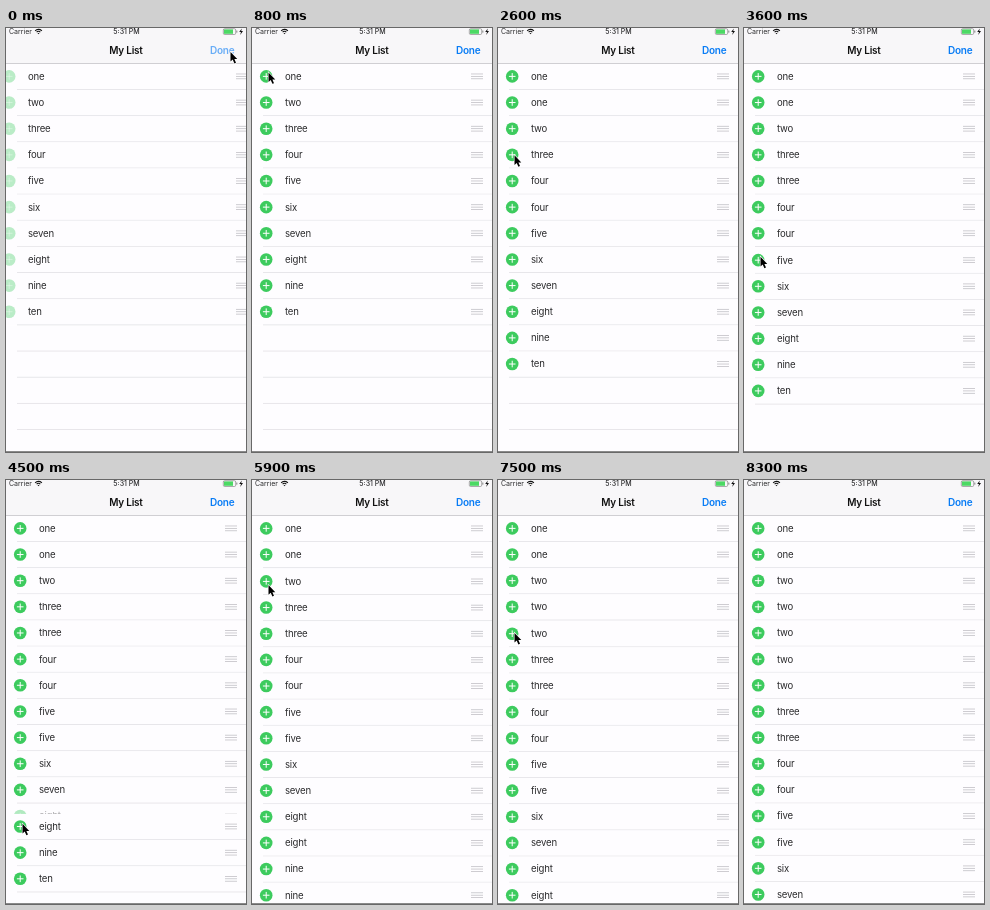
These frames come from a looping animation (240 by 424 pixels, 10000 ms). An HTML page with a canvas:

```html
<!DOCTYPE html>
<html lang="en">
<head>
<meta charset="utf-8">
<title>My List</title>
<style>
  html, body { margin: 0; width: 100%; height: 100%; overflow: hidden; background: #fff; }
  canvas { display: block; width: 240px; height: 424px; }
</style>
</head>
<body>
<canvas id="stage"></canvas>
<script>
const W = 240, H = 424, LOOP = 10000, STEP = 100;
const ROW = 26.15, LIST_TOP = 35.3, VISIBLE_ROWS = 15;
const SLIDE = 300, LEAD = 30, TAP_GAP = 400, LINGER = 200, TRAVEL = 220;
const NAMES = 'one two three four five six seven eight nine ten'.split(' ');
const PAPER = '#fefdff', INK = '#2b2b2d', GREEN = '#3dcb5e', BLUE = '#087cf5';

// The pointer aims at a fractional row; each tap there duplicates that row.
const visit = (aim, at, taps = 1) => ({ aim, at: at - LEAD, taps });
const VISITS = [
  visit(0.35, 1000), visit(4.15, 2200), visit(3.52, 3000), visit(7.4, 3600), visit(11.8, 4400),
  visit(13.5, 5000), visit(2.67, 5900, 2), visit(8.8, 6800, 0), visit(4.5, 7500, 2),
];
const TAPS = VISITS.flatMap(({ aim, at, taps }) =>
  Array.from({ length: taps }, (_, i) => ({ index: Math.floor(aim), at: at + i * TAP_GAP })));

const canvas = document.getElementById('stage');
const ctx = canvas.getContext('2d');
const scale = window.devicePixelRatio || 1;
canvas.width = W * scale;
canvas.height = H * scale;

const clamp = v => Math.min(1, Math.max(0, v));
const smooth = v => { v = clamp(v); return v * v * (3 - 2 * v); };
const mix = (a, b, k) => a + (b - a) * k;

function rect(x, y, w, h, color) {
  ctx.fillStyle = color;
  ctx.fillRect(x, y, w, h);
}

function text(label, x, y, font, color, align = 'left', spacing = 0) {
  ctx.font = font + ' Inter, sans-serif';
  ctx.letterSpacing = spacing + 'px';
  ctx.textAlign = align;
  ctx.fillStyle = color;
  ctx.fillText(label, x, y);
}

function disc(x, y, r, color) {
  ctx.beginPath();
  ctx.arc(x, y, r, 0, 7);
  ctx.fillStyle = color;
  ctx.fill();
}

function shape(path, color) {
  ctx.fillStyle = color;
  ctx.fill(new Path2D(path));
}

const separator = y => rect(11, y - 0.3, W - 11, 0.8, '#e2e1e5');

function drawRow(label, top, edit, alpha = 1) {
  const mid = top + ROW / 2, shift = 11 * (1 - edit);
  rect(0, top + 0.5, W, ROW, PAPER);
  ctx.globalAlpha = alpha;
  text(label, 33 - shift, mid + 3.4, '9.6px', INK, 'left', -0.2);
  for (const dy of [-2.4, 0, 2.4]) rect(219 + shift, mid + dy - 0.4, 12, 0.8, '#c2c1c6');
  ctx.globalAlpha = alpha * mix(0.35, 1, edit);
  disc(14.2 - shift, mid, 6.3, GREEN);
  rect(10.9 - shift, mid - 0.5, 6.6, 1, '#fff');
  rect(13.7 - shift, mid - 3.3, 1, 6.6, '#fff');
  ctx.globalAlpha = 1;
  separator(top + ROW);
}

function drawList(t) {
  const edit = smooth(t / 250);
  const rows = [...NAMES];
  let fresh = -1, progress = 1;
  for (const { at, index } of TAPS.filter(tap => tap.at <= t)) {
    rows.splice(index, 0, rows[index]);
    progress = smooth((t - at) / SLIDE);
    fresh = index;
  }
  for (let i = rows.length; i < VISIBLE_ROWS; i++) separator(LIST_TOP + ROW * (i + 1));

  // A new row fades in underneath while the later rows slide off it.
  const sliding = progress < 1;
  if (sliding) drawRow(rows[fresh], LIST_TOP + ROW * fresh, edit, progress);
  rows.forEach((label, i) => {
    if (sliding && i === fresh) return;
    const lift = i > fresh ? ROW * (1 - progress) : 0;
    drawRow(label, LIST_TOP + ROW * i - lift, edit);
  });
}

function drawStatusBar() {
  text('Carrier', 3, 6.2, '7px', INK);
  text('5:31 PM', 120.5, 6.2, '500 7px', INK, 'center');

  ctx.strokeStyle = '#111';
  ctx.lineWidth = 1.1;
  for (const r of [2.6, 4.6]) {
    ctx.beginPath();
    ctx.arc(32.5, 6, r, -Math.PI * 0.76, -Math.PI * 0.24);
    ctx.stroke();
  }
  shape('M31.5 5h2l-1 1.3z', '#111');

  ctx.beginPath();
  ctx.roundRect(217.3, 0.7, 12.4, 5.8, 1.3);
  ctx.strokeStyle = '#777';
  ctx.lineWidth = 0.6;
  ctx.stroke();
  rect(218, 1.4, 9, 4.4, '#4cd964');
  rect(230.4, 2.6, 0.9, 2, '#777');
  shape('M235.8 .4l-2.6 3.6h1.8l-.8 3 2.8-3.9h-1.8z', '#111');
}

function drawHeader(t) {
  rect(0, 0, W, 35, '#f8f7f9');
  rect(0, 35, W, 0.7, '#bdbcc0');
  drawStatusBar();
  text('My List', 119.9, 25.7, '600 10px', '#111', 'center', -0.25);
  ctx.globalAlpha = mix(0.6, 1, clamp(t / 300));
  text('Done', 204, 25.7, '600 10px', BLUE, 'left', -0.25);
  ctx.globalAlpha = 1;
}

function drawPointer(t) {
  let x = 224.5, y = 24, leave = LINGER;
  const moveTo = (nextX, nextY) => {
    const k = smooth((t - leave) / TRAVEL);
    x = mix(x, nextX, k);
    y = mix(y, nextY, k);
  };
  for (const { aim, at, taps } of VISITS) {
    moveTo(16.5, LIST_TOP + ROW * aim);
    leave = at + Math.max(0, taps - 1) * TAP_GAP + LINGER;
  }
  moveTo(150, H + 10);

  ctx.save();
  ctx.translate(x, y);
  const arrow = 'M0 0v9.6l2.2-2 1.7 3.8 1.6-.7-1.6-3.6h2.9z';
  ctx.lineWidth = 1.2;
  ctx.strokeStyle = '#fff';
  ctx.stroke(new Path2D(arrow));
  shape(arrow, '#000');
  ctx.restore();
}

function draw(now) {
  const t = Math.floor((now % LOOP) / STEP) * STEP;
  ctx.setTransform(scale, 0, 0, scale, 0, 0);
  rect(0, 0, W, H, PAPER);
  drawList(t);
  drawHeader(t);
  rect(0, H - 1, W, 1, '#8a8a8a');
  drawPointer(t);
}

const begin = performance.now();
function frame() {
  draw(performance.now() - begin);
  requestAnimationFrame(frame);
}
frame();
</script>
</body>
</html>
```
